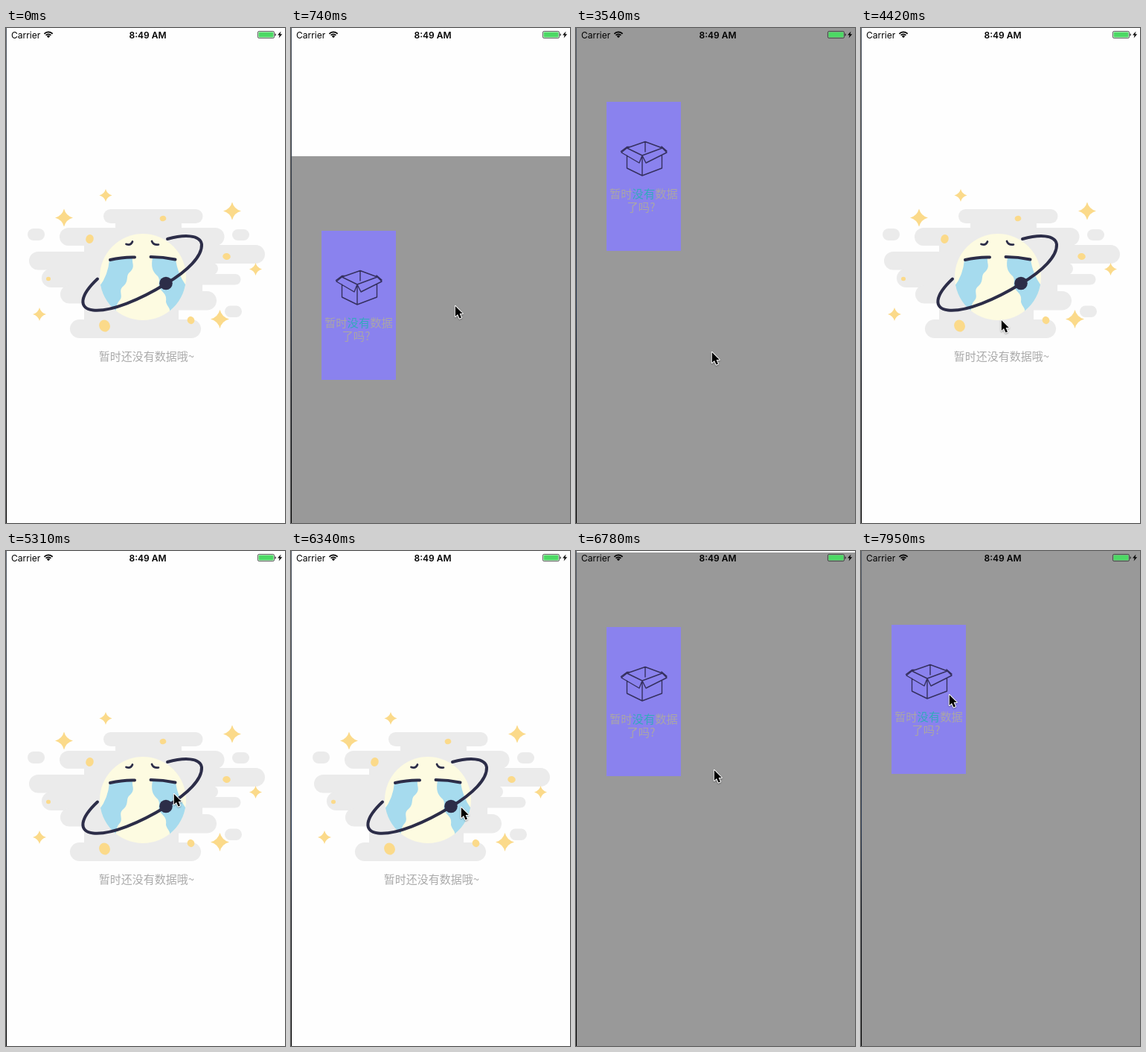
Animation of 375 by 664 pixels, one loop 8000 ms. Source, as an HTML page with a canvas:

```html
<!DOCTYPE html>
<html lang="zh-CN">
<head>
<meta charset="utf-8">
<style>
html, body { margin: 0; width: 100%; height: 100%; overflow: hidden; background: #fefefe; }
canvas { display: block; width: 375px; height: 664px; }
</style>
</head>
<body>
<canvas id="stage"></canvas>
<script>
const W = 375, H = 664, LOOP = 8000, STEP = 147.3;
const canvas = document.getElementById('stage');
const ctx = canvas.getContext('2d');
const dpr = window.devicePixelRatio || 1;
canvas.width = W * dpr;
canvas.height = H * dpr;

const CJK = '"Noto Sans CJK SC", "Noto Sans CJK", sans-serif';
const LATIN = 'Inter, Roboto, sans-serif';
const INK = '#2c2d48', CLOUD = '#ebebeb', GOLD = '#fbda8a';

// Pointer keys: step, x, y
const KEYS = [
  [1, 364, 592], [2, 275, 480], [3, 220, 421], [4, 220, 421], [5, 220, 372],
  [9, 256, 336], [10, 256, 336], [11, 267, 328], [12, 272, 318], [13, 260, 288],
  [15, 172, 205], [16, 125, 186], [17, 112, 198], [18, 132, 229],
  [22, 191, 385], [24, 182, 434], [25, 182, 434], [29, 186, 405], [33, 193, 350],
  [36, 225, 325], [38, 253, 321], [39, 259, 325], [42, 229, 343], [44, 227, 343],
  [46, 185, 293], [48, 95, 218], [49, 80, 208], [51, 127, 224], [52, 139, 225], [54, 118, 192]
];

function pointerAt(k) {
  if (k < KEYS[0][0]) return null;
  const i = KEYS.findIndex(p => p[0] >= k);
  if (i < 1) return KEYS[i < 0 ? KEYS.length - 1 : 0].slice(1);
  const a = KEYS[i - 1], b = KEYS[i], f = (k - a[0]) / (b[0] - a[0]);
  return [a[1] + (b[1] - a[1]) * f, a[2] + (b[2] - a[2]) * f];
}

// Critically damped spring, from 1 down to 0
function settle(ms) {
  const u = Math.max(0, ms) * 0.01826;
  return (1 + u) * Math.exp(-u);
}

function sheetTop(t) {
  const up = t < 3730 ? settle(t - 592) : t < 6356 ? 1 - settle(t - 3730) : settle(t - 6356);
  return Math.round(-1 + 665 * up);
}

function path(d, fill, stroke, width) {
  const p = new Path2D(d);
  if (fill) { ctx.fillStyle = fill; ctx.fill(p); }
  if (stroke) {
    ctx.strokeStyle = stroke;
    ctx.lineWidth = width;
    ctx.stroke(p);
  }
}

function pill(x1, y1, x2, y2) {
  ctx.beginPath();
  ctx.roundRect(x1, y1, x2 - x1, y2 - y1, (y2 - y1) / 2);
  ctx.fill();
}

function oval(x, y, rx, ry, color, turn = 0) {
  ctx.fillStyle = color;
  ctx.beginPath();
  ctx.ellipse(x, y, rx, ry, turn, 0, 7);
  ctx.fill();
}

function star(x, y, r) {
  ctx.fillStyle = GOLD;
  ctx.beginPath();
  ctx.moveTo(x, y - r);
  for (let i = 1; i <= 4; i++) {
    const a = i * Math.PI / 2 - Math.PI / 2, m = a - Math.PI / 4;
    ctx.quadraticCurveTo(x + Math.cos(m) * r * 0.3, y + Math.sin(m) * r * 0.3,
      x + Math.cos(a) * r, y + Math.sin(a) * r);
  }
  ctx.fill();
}

function text(s, x, y, font, color, align = 'left') {
  ctx.font = font;
  ctx.fillStyle = color;
  ctx.textAlign = align;
  ctx.fillText(s, x, y);
}

function clouds() {
  ctx.fillStyle = CLOUD;
  pill(131, 243, 264.5, 262);
  ctx.fillRect(147, 255, 89, 16);
  pill(72, 268, 293.5, 292);
  ctx.fillRect(105, 290, 176, 14);
  pill(31, 300, 200, 324.5);
  pill(170, 291, 348, 316);
  pill(48, 323, 200, 348);
  pill(170, 315, 285, 331);
  ctx.fillRect(180, 310, 98, 14);
  pill(170, 330, 315.5, 344.5);
  pill(73, 345, 200, 369.5);
  ctx.fillRect(170, 340, 94, 18);
  pill(170, 353, 283, 378.5);
  ctx.fillRect(105, 365, 127, 30);
  pill(86, 391, 262, 416);
  pill(29, 269, 52, 285);
  pill(304, 270, 327, 285);
  pill(294, 372.5, 317, 388);
}

function planet() {
  oval(184, 334, 58, 58, '#fdfbe1');
  ctx.save();
  ctx.beginPath();
  ctx.arc(184, 334, 58, 0, 7);
  ctx.clip();
  const tear = '#a6dbee';
  path('M139 311 Q156 306 170 308 C169 316 174 320 167 327 C160 332 166 339 158 346 ' +
    'C150 352 158 359 153 365 C147 371 150 376 146 382 L118 382 L126 346 Q137 332 139 311Z', tear);
  path('M197 308 Q212 306 228 311 Q231 330 241 344 L244 382 L219 384 ' +
    'C223 376 216 374 215 367 C216 358 213 357 208 351 C202 344 209 340 204 333 C196 326 195 320 197 308Z', tear);
  ctx.restore();

  path('M140 311 Q157 307 173 307.5 M194.5 307 Q211 307 227.5 310.5', null, INK, 4);
  path('M161.5 290 Q168 292 170 286.5 M196 286 Q198 291.5 205 290.5', null, INK, 2.7);
  path('M217 283 C239 277 261 277 263 290 C264 306 244 326 215 343 ' +
    'C181 364 141 381 117 378.5 C97 376 99 359 123 336.5', null, INK, 4);
  oval(215, 342.5, 8.8, 8.8, INK);
}

function emptyScreen() {
  clouds();
  planet();
  star(78, 254.5, 12);
  star(134, 224.5, 8.5);
  star(304, 245.5, 12);
  star(335.5, 323.5, 8.5);
  star(287.5, 390.5, 12.5);
  star(45, 384, 9);
  oval(112.5, 283, 5.2, 6, GOLD, 0.3);
  oval(211, 255.5, 4.3, 3.7, GOLD, -0.3);
  oval(296.5, 306.5, 5.3, 4.5, GOLD, 0.2);
  oval(248.5, 392, 4.8, 5.2, GOLD, -0.5);
  oval(132.5, 399.5, 7.3, 8.2, GOLD, -0.4);
  oval(57, 336.5, 3, 2.8, GOLD);
  text('暂时还没有数据哦~', 189, 445.5, '15px ' + CJK, '#aaa', 'center');
}

function sheet(top) {
  ctx.save();
  ctx.translate(0, top);
  ctx.fillStyle = '#999';
  ctx.fillRect(0, 0, W, H + 2);
  ctx.fillStyle = '#8a82ee';
  ctx.fillRect(41, 100, 100, 200);

  // Open carton
  path('M68.5 162 L93 153.5 L116 162 L89 172Z M93 153.5 V167 ' +
    'M68.5 172 V189 L89 199 L115.5 189 V172 M89 172 V199 ' +
    'M68.5 162 L61 168 L85 182 L89 172 M116 162 L122 168 L94 182 L89 172 ' +
    'M60.5 166.5 L68.5 160.5 L72 160.5 M122 166 L115 160', null, '#35305f', 1.4);

  const font = '15.3px ' + CJK, gray = '#aaa6a6';
  text('暂时', 45, 229, font, gray);
  text('没有', 75.6, 229, font, '#35a9bd');
  text('数据', 106.2, 229, font, gray);
  text('了吗?', 87.5, 246.5, font, gray, 'center');
  ctx.restore();
}

function statusBar() {
  text('Carrier', 7, 13.5, '12px ' + LATIN, '#000');
  text('8:49 AM', 190.5, 13.5, '600 12px ' + LATIN, '#000', 'center');

  ctx.strokeStyle = '#000';
  ctx.lineWidth = 1.7;
  ctx.lineCap = 'butt';
  for (const r of [4.7, 7.6]) {
    ctx.beginPath();
    ctx.arc(57, 13, r, -Math.PI * 0.76, -Math.PI * 0.24);
    ctx.stroke();
  }
  path('M57 13.2 L54.8 10.9 Q57 9.2 59.2 10.9Z', '#000');

  ctx.lineWidth = 0.8;
  ctx.strokeStyle = '#333';
  ctx.beginPath();
  ctx.roundRect(338.4, 4.4, 22.2, 9.2, 1.8);
  ctx.stroke();
  ctx.fillStyle = '#4cd964';
  ctx.fillRect(339.5, 5.5, 20, 7);
  path('M361.5 7.3 Q363 7.5 363 9 Q363 10.5 361.5 10.7Z', '#333');
  path('M369.6 4.5 L365 9.6 H367.7 L366.6 13.5 L371.2 8.3 H368.4Z', '#000');
}

function screenEdge() {
  const g = ctx.createLinearGradient(0, 0, 0, H);
  g.addColorStop(0, '#59616c');
  g.addColorStop(0.35, '#2c3542');
  g.addColorStop(0.55, '#2a3b55');
  g.addColorStop(0.72, '#0c1018');
  g.addColorStop(1, '#000');
  ctx.fillStyle = g;
  ctx.fillRect(0, 0, 1, H);
}

function pointer(x, y) {
  ctx.save();
  ctx.translate(Math.round(x) + 0.8, Math.round(y) + 1);
  const arrow = 'M0 0 V14 L3.2 11 L5.7 16.6 L8.2 15.5 L5.8 10.1 H10Z';
  ctx.shadowColor = 'rgba(0,0,0,.35)';
  ctx.shadowBlur = 2 * dpr;
  ctx.shadowOffsetY = dpr;
  path(arrow, null, '#fff', 2);
  ctx.shadowColor = 'transparent';
  path(arrow, '#000');
  ctx.restore();
}

function draw(ms) {
  const k = Math.floor((ms % LOOP + 5) / STEP);
  const top = sheetTop(k * STEP);
  const tip = pointerAt(k);
  ctx.setTransform(dpr, 0, 0, dpr, 0, 0);
  ctx.fillStyle = '#fefefe';
  ctx.fillRect(0, 0, W, H);
  ctx.lineCap = ctx.lineJoin = 'round';
  emptyScreen();
  if (top < H) sheet(top);
  statusBar();
  screenEdge();
  if (tip) pointer(...tip);
}

const start = performance.now();
function tick() {
  draw(performance.now() - start);
  requestAnimationFrame(tick);
}
tick();
</script>
</body>
</html>
```
